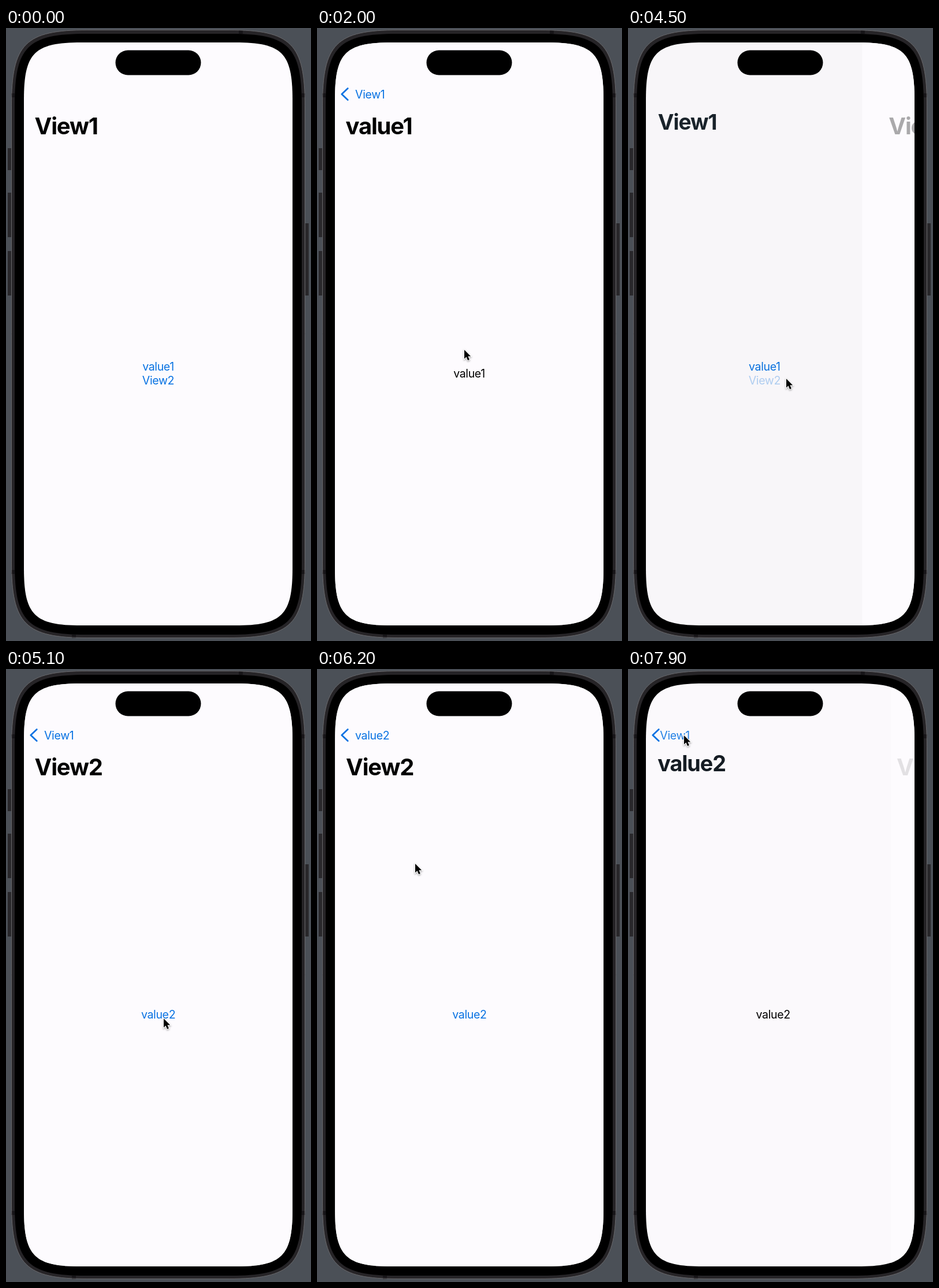
Recreate the animation shown at these times as an HTML page with a canvas. Size 528x1061 px, loop 8 s.

```html
<!DOCTYPE html>
<html lang="en">
<head>
<meta charset="utf-8">
<style>
  html, body { margin: 0; width: 100%; height: 100%; overflow: hidden; background: #4b5057; }
  canvas { display: block; }
</style>
</head>
<body>
<canvas id="stage" width="528" height="1061"></canvas>
<script>
const ctx = document.getElementById('stage').getContext('2d');
const LOOP = 8000, STEP = 100;
const BLUE = '#0872e2', PAPER = '#fdfbfe', INK = '#000';
const LEFT = 31, TOP = 25, WIDTH = 465, HEIGHT = 1009, MIDDLE = 263.5;
const FONT = 'Inter, "Open Sans", sans-serif';

const home = { title: 'View1', rows: ['value1', 'View2'], color: BLUE };
const first = { title: 'value1', back: 'View1', rows: ['value1'], color: INK };
const second = { title: 'View2', back: 'View1', rows: ['value2'], color: BLUE };
const detail = { title: 'value2', back: 'View1', rows: ['value2'], color: INK };
const top2 = { title: 'View2', back: 'value2', rows: ['value2'], color: BLUE };

const moves = [
  { at: 1050, under: home, over: first, push: true },
  { at: 3129, under: home, over: first, push: false },
  { at: 4455, under: home, over: second, push: true },
  { at: 5680, under: second, over: top2, push: true },
  { at: 7675, under: detail, over: top2, push: false }
];

// Pressed controls: start, end, screen, row (-1 is the back button)
const presses = [
  [850, 1300, home, 0], [2200, 3120, first, -1], [4250, 4700, home, 1],
  [5580, 5900, second, 0], [7000, 7660, top2, -1]
];

// Pointer: time, x, y
const pointer = [
  [100, 199, 741], [700, 258, 588], [1300, 258, 588], [1900, 255, 557],
  [2000, 255, 557], [2200, 75.5, 115.5], [3500, 75.5, 115.5], [4100, 273, 606],
  [4500, 274, 607], [5100, 273, 605], [5700, 273, 605], [6200, 170, 337],
  [6400, 170, 337], [6900, 97, 115], [LOOP, 97, 115]
];

const clamp = v => Math.max(0, Math.min(1, v));
const mix = (a, b, k) => a + (b - a) * k;

function spring(ms) {
  const x = Math.max(0, ms) * 0.018;
  return 1 - (1 + x) * Math.exp(-x);
}

// Box with continuous corners, which start well before a circle of radius r would
function squircle(x, y, w, h, r) {
  const e = r * 1.528, c = e * 0.18, x2 = x + w, y2 = y + h, p = new Path2D();
  p.moveTo(x, y + e);
  p.bezierCurveTo(x, y + c, x + c, y, x + e, y);
  p.lineTo(x2 - e, y);
  p.bezierCurveTo(x2 - c, y, x2, y + c, x2, y + e);
  p.lineTo(x2, y2 - e);
  p.bezierCurveTo(x2, y2 - c, x2 - c, y2, x2 - e, y2);
  p.lineTo(x + e, y2);
  p.bezierCurveTo(x + c, y2, x, y2 - c, x, y2 - e);
  p.closePath();
  return p;
}

const shell = squircle(9.5, 3.5, 508, 1052, 86);
const bezel = squircle(15, 10, 497, 1040, 81);
const glass = squircle(LEFT, TOP, WIDTH, HEIGHT, 65);
const arrow = new Path2D('M0 0V15.6L3.5 12.3L6.1 18.2L8.9 17L6.4 11.2H11.2Z');

function box(color, x, y, w, h) {
  ctx.fillStyle = color;
  ctx.fillRect(x, y, w, h);
}

function text(str, x, y, size, color, alpha = 1, weight = 400, align = 'left') {
  if (alpha <= 0) return;
  ctx.globalAlpha = alpha;
  ctx.font = `${weight} ${size}px ${FONT}`;
  ctx.letterSpacing = `${size * (weight > 400 ? -0.03 : -0.02)}px`;
  ctx.textAlign = align;
  ctx.fillStyle = color;
  ctx.fillText(str, x, y);
  ctx.globalAlpha = 1;
}

function drawPhone() {
  box('#4b5057', 0, 0, 528, 1061);
  for (const [y, h] of [[208, 38], [285, 77], [386, 77]]) box('#29282b', 3, y, 6, h);
  box('#29282b', 518, 338, 6, 125);
  ctx.fillStyle = '#262427';
  ctx.fill(shell);
  for (const y of [113, 938]) {
    box('#171518', 9, y, 6, 7);
    box('#171518', 512, y, 6, 7);
  }
  box('#171518', 403, 4, 7, 6);
  box('#171518', 114, 1050, 7, 6);
  ctx.strokeStyle = '#69686b';
  ctx.lineWidth = 1;
  ctx.stroke(shell);
  ctx.fillStyle = '#000';
  ctx.fill(bezel);
}

const pressAlpha = (t, screen, row) =>
  presses.some(p => t >= p[0] && t < p[1] && p[2] === screen && p[3] === row) ? 0.3 : 1;

function drawPage(screen, shift, t) {
  box(PAPER, LEFT + shift, TOP, WIDTH, HEIGHT);
  const base = screen.rows.length > 1 ? 593 : 605;
  screen.rows.forEach((row, i) =>
    text(row, MIDDLE + shift, base + i * 24, 19.6, screen.color, pressAlpha(t, screen, i), 400, 'center'));
}

function drawChevron(alpha) {
  if (alpha <= 0) return;
  ctx.globalAlpha = alpha;
  ctx.strokeStyle = BLUE;
  ctx.lineWidth = 2.8;
  ctx.lineCap = ctx.lineJoin = 'round';
  ctx.stroke(new Path2D('M53.3 104.6L42.8 114.5L53.3 124.4'));
  ctx.globalAlpha = 1;
}

// k: 0 shows the lower screen's bar, 1 the upper one's
function drawBar({ under, over, push }, k, t) {
  const pressed = pressAlpha(t, over, -1);
  const label = clamp((k - 0.7) / 0.3);
  const x = mix(49.5, 66, k), y = mix(184, 121.5, k), size = mix(40, 19.6, k);
  const tint = `rgb(${40 * k}, ${110 * k}, ${180 * k})`;
  text(under.title, x, y, size, tint, (1 - 0.62 * k) * (1 - label), 700);
  text(over.back, x, y, size, BLUE, label * pressed);
  if (under.back) text(under.back, 66 - 100 * k, 121.5, 19.6, BLUE, 1 - k);
  drawChevron((under.back ? 1 : clamp((k - 0.75) / 0.25)) * pressed);
  text(over.title, 49.5 + WIDTH * (1 - k), 184, 40, INK, push ? clamp(k * 2.4) : k, 700);
}

function drawPointer(t) {
  if (t < pointer[0][0]) return;
  const i = pointer.findIndex(p => p[0] > t);
  const [t0, x0, y0] = pointer[i - 1], [t1, x1, y1] = pointer[i];
  const u = (t - t0) / (t1 - t0), k = u * u * (3 - 2 * u);
  ctx.save();
  ctx.translate(mix(x0, x1, k), mix(y0, y1, k));
  ctx.shadowColor = 'rgba(0,0,0,.35)';
  ctx.shadowBlur = 3;
  ctx.shadowOffsetY = 1.5;
  ctx.strokeStyle = '#fff';
  ctx.lineWidth = 2;
  ctx.lineJoin = 'miter';
  ctx.stroke(arrow);
  ctx.shadowColor = 'transparent';
  ctx.fillStyle = '#000';
  ctx.fill(arrow);
  ctx.restore();
}

function draw(t) {
  const move = moves.filter(m => m.at <= t).pop() || moves[0];
  const p = spring(t - move.at), q = p ** 1.22;
  const depth = move.push ? p : 1 - p;
  drawPhone();
  ctx.save();
  ctx.clip(glass);
  drawPage(move.under, -0.3 * WIDTH * depth, t);
  box(PAPER, LEFT + WIDTH * (1 - 0.3 * depth), TOP, WIDTH, HEIGHT);
  box(`rgba(0,0,0,${0.11 * depth})`, LEFT, TOP, WIDTH, HEIGHT);
  drawPage(move.over, WIDTH * (1 - depth), t);
  drawBar(move, move.push ? q : 1 - q, t);
  ctx.restore();
  ctx.fillStyle = '#000';
  ctx.beginPath();
  ctx.roundRect(189.5, 38.5, 148, 43, 21.5);
  ctx.fill();
  drawPointer(t);
}

function tick() {
  draw(Math.floor(performance.now() % LOOP / STEP) * STEP);
  requestAnimationFrame(tick);
}
tick();
</script>
</body>
</html>
```
